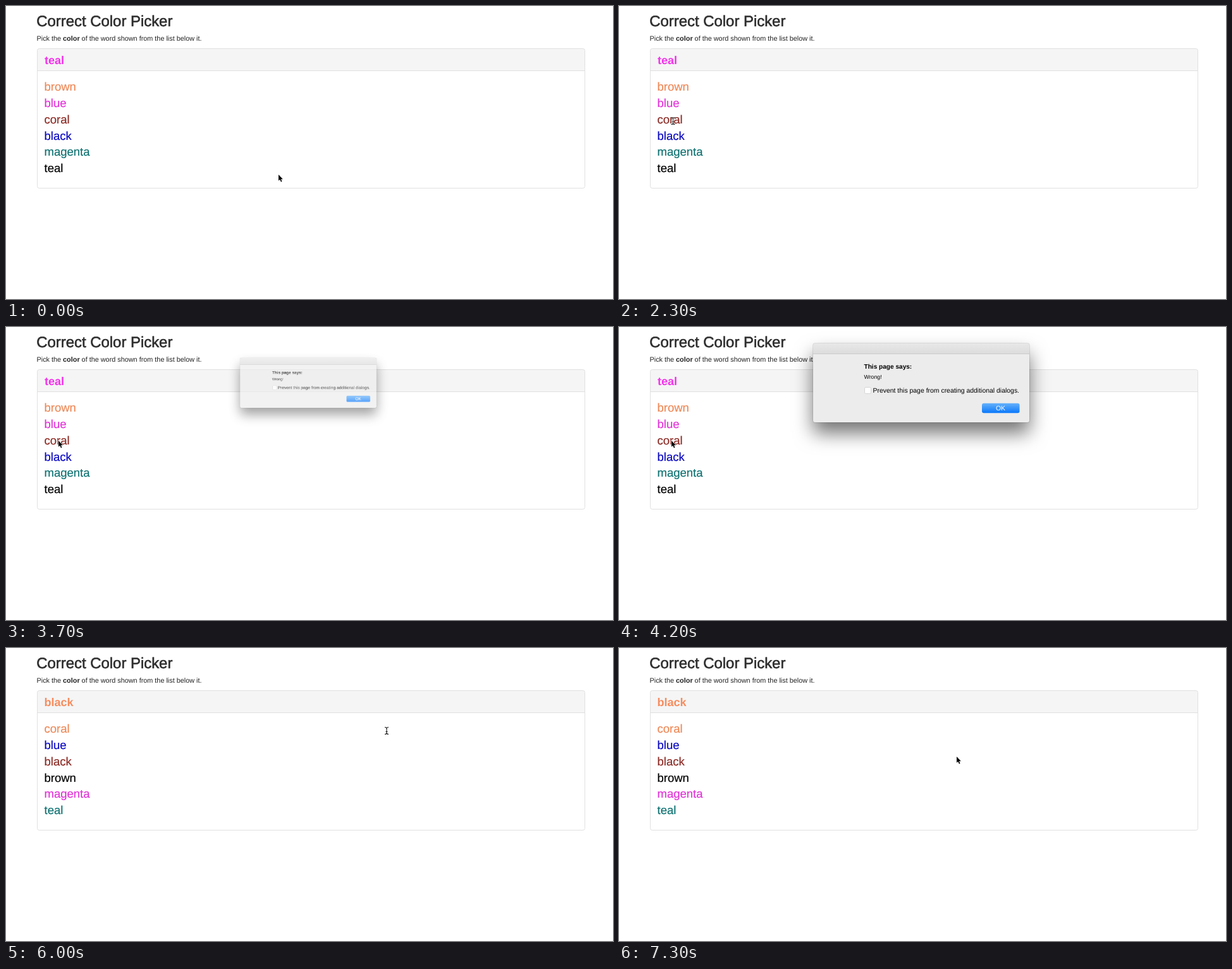
Write an HTML page that moves like this. It is 960x464 px and loops after 7400 ms.

```html
<!DOCTYPE html>
<html lang="en">
<head>
<meta charset="utf-8">
<title>Correct Color Picker</title>
<style>
  html, body { margin: 0; width: 100%; height: 100%; overflow: hidden; background: #fff; }
  svg {
    display: block; width: 960px; height: 464px;
    font-family: "Liberation Sans", Arial, sans-serif;
    text-rendering: geometricPrecision;
  }

  .title { font-size: 23.9px; fill: #2e2e2e; stroke: #2e2e2e; stroke-width: .6px; }
  .hint { font-size: 10.85px; fill: #222; }
  .list { font-size: 18.5px; stroke-width: .2px; }
  .word { font-size: 18px; font-weight: bold; }

  .brown { fill: #8c2b25; stroke: #8c2b25; }
  .blue { fill: #0a08c0; stroke: #0a08c0; }
  .coral { fill: #ee8958; stroke: #ee8958; }
  .black { fill: #000; stroke: #000; }
  .magenta { fill: #e233d8; stroke: #e233d8; }
  .teal { fill: #0f7272; stroke: #0f7272; }
  .word.magenta { fill: #f331eb; stroke: none; }
  .word.coral { fill: #f68c5e; stroke: none; }

  /* One loop is 7400 ms; the small negative delay keeps steps clear of their edges. */
  .first, .second, .dialog, .cursor, .arrow, .beam {
    animation: 7400ms step-end -4ms infinite;
  }
  .first { animation-name: leave; }
  .second { animation-name: enter; }
  .dialog { animation-name: pop; transform-origin: 478px 88.5px; }
  .cursor { animation-name: move; }
  .arrow { animation-name: arrow; }
  .beam { animation-name: beam; }

  @keyframes leave { 0% { opacity: 1 } 78.378%, 100% { opacity: 0 } }
  @keyframes enter { 0% { opacity: 0 } 78.378%, 100% { opacity: 1 } }
  @keyframes pop {
    0% { opacity: 0; transform: scale(.63) }
    50% { opacity: .68; transform: scale(.63) }
    51.351% { opacity: 1; transform: none }
    78.378%, 100% { opacity: 0; transform: none }
  }
  @keyframes move {
    0% { transform: translate(431px, 267px); animation-timing-function: steps(10) }
    13.514% { transform: translate(216px, 225px); animation-timing-function: steps(8) }
    24.324% { transform: translate(85.5px, 182px) }
    50% { transform: translate(83px, 180px) }
    58.108% { transform: translate(83px, 180px); animation-timing-function: steps(10) }
    71.622% { transform: translate(577px, 150px); animation-timing-function: steps(3) }
    75.676% { transform: translate(602px, 131px) }
    90.541% { transform: translate(602px, 131px); animation-timing-function: steps(6) }
    98.649%, 100% { transform: translate(534px, 172px) }
  }
  @keyframes beam {
    0%, 50%, 91.892%, 100% { opacity: 0 }
    24.324%, 78.378% { opacity: 1 }
  }
  @keyframes arrow {
    0%, 50%, 91.892%, 100% { opacity: 1 }
    24.324%, 78.378% { opacity: 0 }
  }

  .sheet { fill: #ececec; filter: drop-shadow(0 17px 15px rgba(0, 0, 0, .55)); }
  .dialog text { font-size: 10.45px; }
  .dialog .says { font-size: 10.1px; font-weight: bold; }
  .dialog .note { font-size: 8.8px; }
</style>
</head>
<body>
<svg viewBox="0 0 960 464">
  <defs>
    <linearGradient id="bar" x2="0" y2="1">
      <stop stop-color="#e8e8e8"/><stop offset="1" stop-color="#dcdcdc"/>
    </linearGradient>
    <linearGradient id="button" x2="0" y2="1">
      <stop stop-color="#65b1fa"/><stop offset="1" stop-color="#0a78fb"/>
    </linearGradient>
    <path id="caret" d="M-3-5.5Q0-5.5 0-3.5Q0-5.5 3-5.5M0-4V4M-3 5.500Q0 5.500 0 3.500Q0 5.500 3 5.500M-1.500 1.500H1.500"/>
  </defs>

  <text class="title" x="48.3" y="32.3">Correct Color Picker</text>
  <text class="hint" x="48.5" y="55.2">Pick the <tspan font-weight="bold">color</tspan> of the word shown from the list below it.</text>

  <path d="M49.5 102.5V70.5a3 3 0 0 1 3-3H912.5a3 3 0 0 1 3 3V102.5z" fill="#f5f5f5"/>
  <path d="M49.5 102.5H915.5" stroke="#e0e0e0"/>
  <rect x="49.5" y="67.5" width="866" height="221" rx="3" fill="none" stroke="#e0e0e0"/>

  <g class="first list">
    <text class="word magenta" x="61" y="92">teal</text>
    <text class="coral" x="60.5" y="134.3">brown</text>
    <text class="magenta" x="60.5" y="160">blue</text>
    <text class="brown" x="60.5" y="185.8">coral</text>
    <text class="blue" x="60.5" y="211.5">black</text>
    <text class="teal" x="60.5" y="237.2">magenta</text>
    <text class="black" x="60.5" y="263">teal</text>
  </g>
  <g class="second list">
    <text class="word coral" x="60.5" y="92">black</text>
    <text class="coral" x="60.5" y="134.3">coral</text>
    <text class="blue" x="60.5" y="160">blue</text>
    <text class="brown" x="60.5" y="185.8">black</text>
    <text class="black" x="60.5" y="211.5">brown</text>
    <text class="magenta" x="60.5" y="237.2">magenta</text>
    <text class="teal" x="60.5" y="263">teal</text>
  </g>

  <g class="dialog">
    <rect class="sheet" x="307" y="26" width="342" height="125" rx="3"/>
    <path d="M307 42.5V29a3 3 0 0 1 3-3H646a3 3 0 0 1 3 3V42.5z" fill="url(#bar)"/>
    <path d="M307 42.5H649" stroke="#cacaca"/>
    <rect x="306.5" y="25.5" width="343" height="126" rx="3.5" fill="none" stroke="#000" stroke-opacity=".1"/>
    <text class="says" x="387.5" y="65.5">This page says:</text>
    <text class="note" x="387.5" y="82">Wrong!</text>
    <rect x="388.5" y="95.5" width="10" height="10" rx="2" fill="#fff" stroke="#d4d4d4"/>
    <text x="401.5" y="104">Prevent this page from creating additional dialogs.</text>
    <rect x="574" y="120.7" width="59.5" height="15.6" rx="3" fill="url(#button)"/>
    <text x="603.5" y="132.3" text-anchor="middle" fill="#fff">OK</text>
  </g>

  <g class="cursor">
    <path class="arrow" d="M0 0V9.8L2.2 7.8 3.9 11.6 5.5 10.9 3.9 7.2H6.9z" stroke="#fff" stroke-width="1.2" paint-order="stroke"/>
    <g class="beam" fill="none">
      <use href="#caret" stroke="#fff" stroke-opacity=".7" stroke-width="2.2"/>
      <use href="#caret" stroke="#111" stroke-width="1.1"/>
    </g>
  </g>
</svg>
</body>
</html>
```
